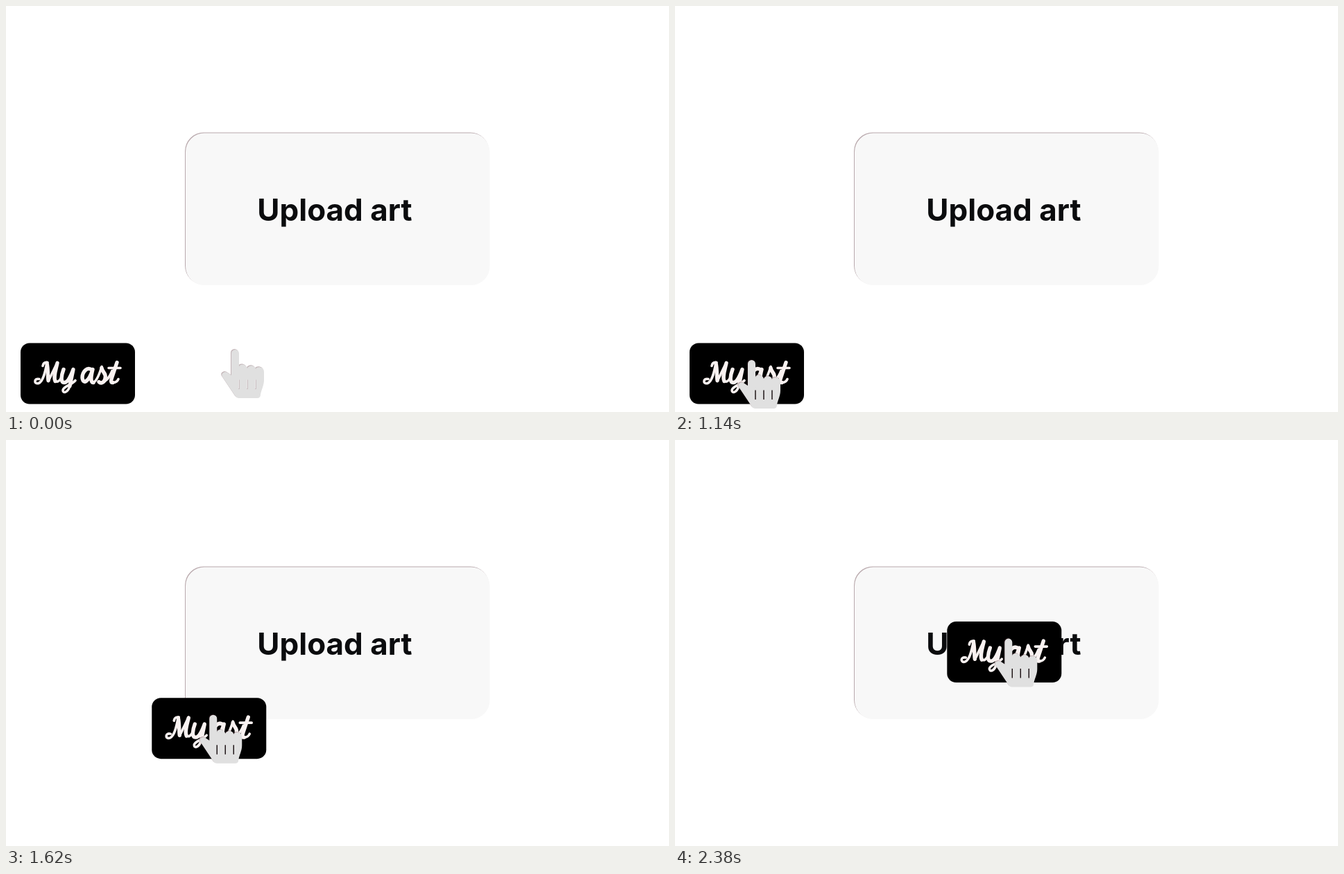
Recreate the animation shown at these times as an HTML page. Size 956 px wide and 586 px high, loop 2.4 s.

```html
<!DOCTYPE html>
<html lang="en">
<head>
<meta charset="utf-8">
<title>Upload art</title>
<style>
  html, body { margin: 0; width: 100%; height: 100%; overflow: hidden; background: #fff; }
  svg { display: block; width: 956px; height: 586px; }
  .panel { fill: #f8f8f8; filter: drop-shadow(-.1px -.7px .5px rgb(80 40 50 / .4)); }
  .label { font: 700 44px Inter, sans-serif; fill: #0b0c0e; text-anchor: middle; }
  .script { fill: none; stroke: #faf2f1; stroke-linecap: round; stroke-linejoin: round; }
  #hand { fill: #e0e0e0; fill-rule: evenodd; filter: drop-shadow(-.3px -.4px .4px rgb(80 40 50 / .35)); }
</style>
</head>
<body>
<svg viewBox="0 0 956 586">
  <rect class="panel" x="259" y="183.5" width="438.5" height="219.5" rx="27"/>
  <text class="label" x="474" y="309.5">Upload art</text>

  <g id="card" role="img" aria-label="My art">
    <rect width="165" height="88" rx="13"/>
    <g class="script">
      <g stroke-width="3.6">
        <path d="M27 52C19 50 19 60 26 58C33 55 36 40 38 28M32 33Q33 27 39 28M40 55L53 28M50 54Q54 59 60 48"/>
        <path d="M71 62C68 72 61 73 61 68C62 62 73 61 79 54"/>
        <path d="M105 57Q111 54 117 34M115 57Q126 56 132 40M127 36H144M133 57Q139 57 141 52"/>
      </g>
      <g stroke-width="5.4">
        <path d="M38 29C40 38 39 47 40 54M53 29C51 38 47 49 50 55"/>
        <path d="M62 38C59 46 57 57 63 57C69 57 73 46 76 38L71 62"/>
        <path d="M103 39C96 33 89 42 89 50C90 60 98 57 104 38C102 46 100 57 105 57"/>
        <path d="M117 36C118 43 124 43 122 51C121 57 116 59 113 56M139 28L132 49C130 55 130 57 133 57"/>
      </g>
    </g>
  </g>

  <path id="hand" d="M14 37V5.5a5.5 5.5 0 0 1 11 0V25
    c0-5 10-5 12 2c2-5 11-5 12 1c1-4 12-4 12 4
    V44c0 8-4 14-5 21q0 5-5 5H25q-4 0-6-4L1 39
    C-2 34 5 31 8 33Z
    M24.3 43.5v13.5h1.4v-13.5Z M36.3 43.5v13.5h1.4v-13.5Z M48.3 43.5v13.5h1.4v-13.5Z"/>
</svg>
<script>
  const LOOP = 2400, HALF = LOOP / 2, STEP = 20;
  const card = document.getElementById('card');
  const hand = document.getElementById('hand');

  // cubic-bezier(0, 0, .58, 1), solved for its parameter by bisection
  function easeOut(x) {
    let lo = 0, hi = 1;
    for (let i = 0; i < 30; i++) {
      const u = (lo + hi) / 2;
      if (1.74 * u * u - 0.74 * u ** 3 < x) lo = u; else hi = u;
    }
    return 3 * lo * lo - 2 * lo ** 3;
  }

  const progress = (time, start) =>
    easeOut(Math.min(1, Math.max(0, (time - start) / HALF)));

  const place = (el, x, y) => el.setAttribute('transform', `translate(${x} ${y})`);

  function draw(now) {
    const time = Math.floor(now % LOOP / STEP) * STEP;
    const reach = progress(time, 0);
    const drag = progress(time, HALF);
    const dx = 371.5 * drag, dy = -224.5 * drag;
    place(card, 21 + dx, 486.5 + dy);
    place(hand, 311 - 221 * reach + dx, 496 + 15 * reach + dy);
    requestAnimationFrame(draw);
  }
  requestAnimationFrame(draw);
</script>
</body>
</html>
```
